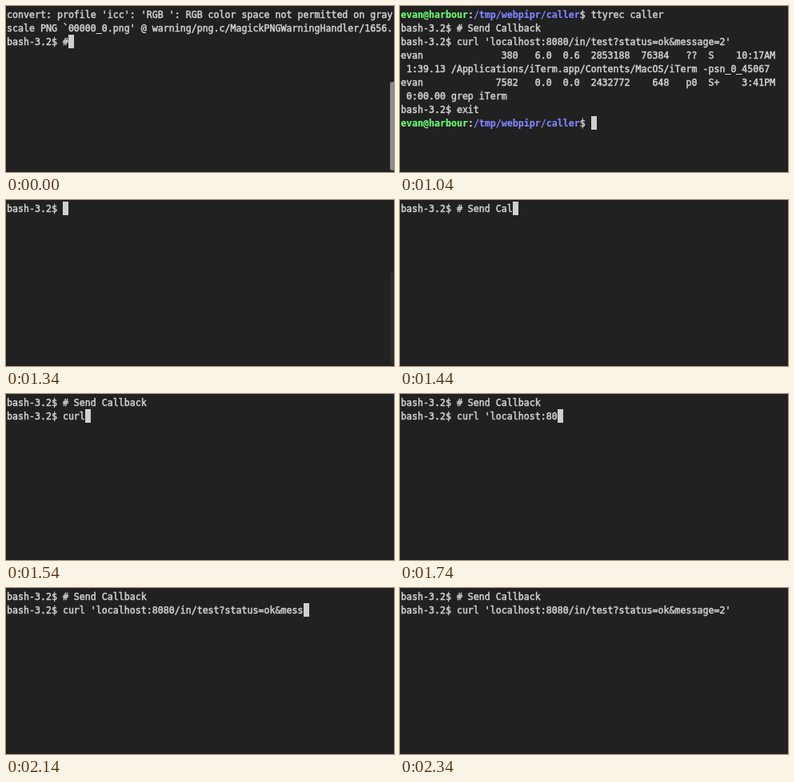
An HTML page that plays this animation: 485x208 px, repeating every 8 s.

```html
<!DOCTYPE html>
<html lang="en">
<head>
<meta charset="utf-8">
<title>Terminal session</title>
<style>
html, body { margin: 0; width: 100%; height: 100%; overflow: hidden; background: #212121; }
svg { display: block; width: 485px; height: 208px; }
text {
  font: 11.627px "DejaVu Sans Mono", monospace;
  white-space: pre;
  color: #d0d0d0;
  fill: currentColor;
  stroke: currentColor;
  stroke-width: .5px;
}
.host, .path { font-weight: bold; fill: currentColor; stroke: currentColor; stroke-width: .15px; }
.host { color: #6cff74; }
.path { color: #8084ff; }
#cursor { fill: #cfcfcf; }
</style>
</head>
<body>
<svg viewBox="0 0 485 208">
  <g id="rows"></g>
  <rect id="cursor" width="7" height="17"/>
  <rect id="thumb" x="480" width="8" rx="3"/>
</svg>
<script>
const LOOP = 8000, COL = 7, ROW = 17, LEFT = 1, TOP = 2, BASE = 15;
const $ = id => document.getElementById(id);

const HOST = 'evan@harbour', PATH = '/tmp/webpipr/caller';
const shell = `${HOST}:${PATH}$ `;
const bash = 'bash-3.2$ ';
const note = '# Send Callback';
const curl = "curl 'localhost:8080/in/test?status=ok&message=2'";

const warning = [
  "convert: profile 'icc': 'RGB ': RGB color space not permitted on gray",
  "scale PNG `00000_0.png' @ warning/png.c/MagickPNGWarningHandler/1656.",
  bash + '#'
];
const history = [
  shell + 'ttyrec caller',
  bash + note,
  bash + curl,
  'evan              380   6.0  0.6  2853188  76384   ??  S    10:17AM',
  ' 1:39.13 /Applications/iTerm.app/Contents/MacOS/iTerm -psn_0_45067',
  'evan             7582   0.0  0.0  2432772    648   p0  S+    3:41PM',
  ' 0:00.00 grep iTerm',
  bash + 'exit'
];
const replay = typed => [...history, shell + typed];
const request = n => [bash + note, bash + curl.slice(0, n)];

// start time, rows, and optional scrollbar thumb or hidden cursor
const steps = [
  { at: 0, rows: warning, thumb: [95, 111, '#8c8c8c'] },
  { at: 1040, rows: replay('') },
  { at: 1140, rows: replay('ttygif ') },
  { at: 1240, rows: replay('ttygif caller ') },
  { at: 1340, rows: [bash], thumb: [91, 115, '#2b2b2b'] },
  { at: 1440, rows: [bash + note.slice(0, 10)] },
  ...[4, 11, 18, 25, 31, 37, 43, 49].map((n, i) => ({ at: 1540 + i * 100, rows: request(n) })),
  { at: 2340, rows: request(curl.length), idle: true }
];

function make(tag, parent, attrs, content) {
  const el = document.createElementNS('http://www.w3.org/2000/svg', tag);
  for (const key in attrs) el.setAttribute(key, attrs[key]);
  if (content) el.textContent = content;
  return parent.appendChild(el);
}

function drawRow(line, i) {
  const text = make('text', $('rows'), { x: LEFT, y: BASE + i * ROW });
  if (!line.startsWith(shell)) {
    text.textContent = line;
    return;
  }
  make('tspan', text, { class: 'host' }, HOST);
  make('tspan', text, {}, ':');
  make('tspan', text, { class: 'path' }, PATH);
  make('tspan', text, {}, line.slice(shell.length - 2));
}

function show({ rows, thumb, idle }) {
  $('rows').replaceChildren();
  rows.forEach(drawRow);
  const last = rows.length - 1;
  $('cursor').setAttribute('x', LEFT + rows[last].length * COL);
  $('cursor').setAttribute('y', TOP + last * ROW);
  $('cursor').style.display = idle ? 'none' : '';
  $('thumb').style.display = thumb ? '' : 'none';
  if (thumb) ['y', 'height', 'fill'].forEach((key, i) => $('thumb').setAttribute(key, thumb[i]));
}

let current;
const start = performance.now();

function tick() {
  const t = (performance.now() - start) % LOOP;
  const step = steps.findLast(s => s.at <= t);
  if (step !== current) show(current = step);
  requestAnimationFrame(tick);
}
tick();
</script>
</body>
</html>
```
